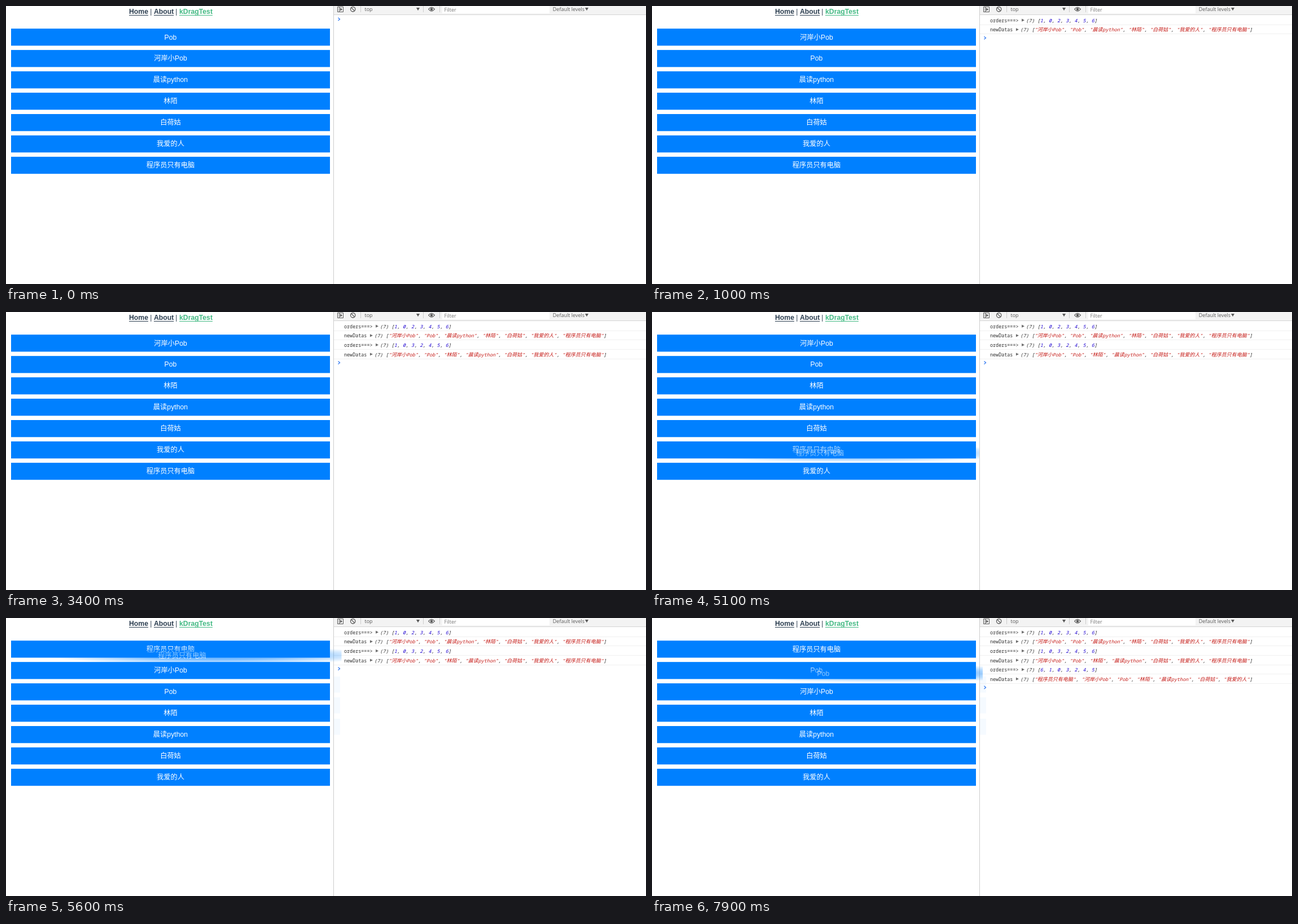
An HTML page with a canvas that plays this animation: 1134 by 494 pixels, repeating every 8 s.

```html
<!DOCTYPE html>
<html lang="zh-CN">
<head>
<meta charset="utf-8">
<title>Drag list</title>
<style>
html, body { margin: 0; width: 100%; height: 100%; overflow: hidden; background: #fff; }
canvas { display: block; }
</style>
</head>
<body>
<canvas id="stage" width="1134" height="494"></canvas>
<script>
const ctx = document.getElementById('stage').getContext('2d');
const LOOP = 8000, STEP = 100;
const BAR = { x: 9, y: 40.2, w: 565, h: 30.3, pitch: 37.95 };
const CJK = '"Noto Sans CJK SC", "Noto Sans CJK"';
const SANS = `"Liberation Sans", ${CJK}, sans-serif`;
const UI = '"Open Sans", "Noto Sans", sans-serif';
const MONO = '8.43px "Noto Sans Mono", monospace';
const labels = ['Pob', '河岸小Pob', '晨读python', '林陌', '白荷姑', '我爱的人', '程序员只有电脑'];

// Path points: sideways shift and middle of the dragged bar, one per step
const drags = [
  { start: 500, end: 1000, from: 0, cx: 345,
    path: [[1, 61], [2, 70], [3, 83], [4, 90], [4, 93]] },
  { start: 2800, end: 3400, from: 2, cx: 345,
    path: [[1.5, 144], [2, 153], [3, 162], [4, 167], [5, 170]] },
  { start: 5100, end: 6000, from: 6, cx: 350,
    path: [[6, 251], [13, 225], [18, 193], [18, 155], [18, 118], [20.5, 66.5], [23, 61], [24, 59]] },
  { start: 7800, end: 8000, from: 2, cx: 395,
    path: [[7, 118], [12, 98.3]] }
];

function text(s, x, y, font, color, align = 'left') {
  ctx.font = font;
  ctx.fillStyle = color;
  ctx.textAlign = align;
  ctx.fillText(s, x, y);
  return x + ctx.measureText(s).width;
}

function rect(x, y, w, h, color) {
  ctx.fillStyle = color;
  ctx.fillRect(x, y, w, h);
}

function poly(points, color) {
  ctx.fillStyle = color;
  ctx.beginPath();
  points.forEach(p => ctx.lineTo(p[0], p[1]));
  ctx.fill();
}

function stroke(color, width, draw) {
  ctx.strokeStyle = color;
  ctx.lineWidth = width;
  ctx.beginPath();
  draw();
  ctx.stroke();
}

function move(order, from, to) {
  const next = order.slice();
  next.splice(to, 0, next.splice(from, 1)[0]);
  return next;
}

function slot(mid) {
  return Math.round((mid - 55.3) / BAR.pitch);
}

// Soft copy of a bar that fades away from the pointer
const layer = document.createElement('canvas');
layer.width = 1134;
layer.height = 494;
const soft = layer.getContext('2d');

function drawGhost(label, dx, mid, cx) {
  soft.globalCompositeOperation = 'source-over';
  soft.clearRect(0, 0, 1134, 494);
  soft.fillStyle = '#0080ff';
  soft.fillRect(BAR.x + dx, mid - BAR.h / 2, BAR.w, BAR.h);
  soft.font = `12.25px ${SANS}`;
  soft.textAlign = 'center';
  soft.fillStyle = '#fff';
  soft.fillText(label, 291.5 + dx, mid + 4.2);
  soft.globalCompositeOperation = 'destination-in';
  soft.save();
  soft.translate(cx + dx, mid);
  soft.scale(300, 16.5);
  const fade = soft.createRadialGradient(0, 0, 0, 0, 0, 1);
  fade.addColorStop(0, 'rgba(0,0,0,.66)');
  fade.addColorStop(0.45, 'rgba(0,0,0,.5)');
  fade.addColorStop(0.75, 'rgba(0,0,0,.22)');
  fade.addColorStop(1, 'rgba(0,0,0,0)');
  soft.fillStyle = fade;
  soft.fillRect(-4, -40, 8, 80);
  soft.restore();
  ctx.drawImage(layer, 0, 0);
}

function drawNav() {
  const bold = `bold 12.25px ${SANS}`;
  const link = (s, x, color) => {
    const end = text(s, x, 14.3, bold, color);
    rect(x, 16, end - x, 1, color);
  };
  link('Home', 218, '#2c3e50');
  text('|', 255.3, 14.3, `12.25px ${SANS}`, '#2c3e50');
  link('About', 262, '#2c3e50');
  text('|', 300.3, 14.3, `12.25px ${SANS}`, '#2c3e50');
  link('kDragTest', 307, '#42b983');
}

function drawBars(order) {
  order.forEach((id, i) => {
    const y = BAR.y + BAR.pitch * i;
    rect(BAR.x, y, BAR.w, BAR.h, '#0080ff');
    text(labels[id], 291.5, y + 19.3, `12.25px ${SANS}`, '#fff', 'center');
  });
}

function drawToolbar() {
  const gray = '#5a5a5a';
  rect(580, 0, 1, 494, '#cccccc');
  rect(581, 0, 553, 15, '#f3f3f3');
  rect(581, 15, 553, 1, '#d4d4d4');
  stroke(gray, 1, () => {
    ctx.rect(587.5, 1.5, 10, 9);
    ctx.moveTo(590.5, 1.5);
    ctx.lineTo(590.5, 10.5);
  });
  poly([[592, 3], [596, 6], [592, 9]], gray);
  stroke(gray, 1.3, () => {
    ctx.arc(614.7, 5.8, 4.2, 0, Math.PI * 2);
    ctx.moveTo(611.8, 2.9);
    ctx.lineTo(617.6, 8.7);
  });
  [628, 739, 768].forEach(x => rect(x, 0, 1, 11, '#cccccc'));
  text('top', 635.5, 9.2, `9px ${UI}`, gray);
  poly([[727, 3], [733, 3], [730, 8.3]], gray);
  stroke(gray, 1.2, () => {
    ctx.moveTo(748.5, 5.7);
    ctx.quadraticCurveTo(754, -1, 759.5, 5.7);
    ctx.quadraticCurveTo(754, 12.4, 748.5, 5.7);
  });
  ctx.fillStyle = gray;
  ctx.beginPath();
  ctx.arc(754, 5.7, 2.3, 0, Math.PI * 2);
  ctx.fill();
  rect(773, 0, 190, 13, '#fff');
  text('Filter', 776.5, 9.7, `9px ${UI}`, '#757575');
  text('Default levels', 968.8, 9.2, `9px ${UI}`, gray);
  poly([[1026, 3], [1032, 3], [1029, 8.3]], gray);
}

function run(s, x, y, color, style = 'italic') {
  for (const part of s.match(/[\u4e00-\u9fff]+|[^\u4e00-\u9fff]+/g)) {
    const font = part[0] >= '\u4e00' ? `9px ${CJK}, sans-serif` : MONO;
    x = text(part, x, y, `${style} ${font}`, color);
  }
  return x;
}

function logLine(row, title, items, color) {
  const y = 28.8 + row * 16.6, dark = '#303030';
  let x = run(title, 599, y, dark, 'normal') + 5.5;
  poly([[x, y - 6.2], [x + 5, y - 3.6], [x, y - 1]], '#6e6e6e');
  x = run('(7) [', x + 7.5, y, dark);
  items.forEach((item, i) => {
    if (i) x = run(', ', x, y, dark);
    x = run(item, x, y, color);
  });
  run(']', x, y, dark);
  rect(581, Math.round(y + 4), 553, 1, '#f0f0f0');
}

function drawConsole(logs) {
  logs.forEach((order, i) => {
    logLine(i * 2, 'orders===>', order.map(String), '#1c00cf');
    logLine(i * 2 + 1, 'newDatas', order.map(id => `"${labels[id]}"`), '#c41a16');
  });
  const y = 23.4 + logs.length * 33.35;
  stroke('#367cf1', 1.3, () => {
    ctx.moveTo(588.5, y - 2.6);
    ctx.lineTo(591.5, y);
    ctx.lineTo(588.5, y + 2.6);
  });
}

// Pale trail left beside the list by the long drag
function drawTrail(t) {
  [179, 141, 104].forEach((y, i) => {
    if (t >= 5300 + i * STEP) rect(581, y, 11, 28.5, '#f5faff');
  });
}

function draw(t) {
  let order = labels.map((_, i) => i);
  let ghost = null;
  const logs = [];
  for (const d of drags) {
    if (t < d.start) break;
    const k = Math.min(Math.floor((t - d.start) / STEP), d.path.length - 1);
    const [dx, mid] = d.path[k];
    const id = order[d.from];
    order = move(order, d.from, slot(mid));
    if (t >= d.end) logs.push(order);
    else ghost = [labels[id], dx, mid, d.cx];
  }
  rect(0, 0, 1134, 494, '#fff');
  drawNav();
  drawBars(order);
  drawToolbar();
  drawTrail(t);
  drawConsole(logs);
  if (ghost) drawGhost(...ghost);
}

const begin = performance.now();
function tick() {
  draw((performance.now() - begin) % LOOP);
  requestAnimationFrame(tick);
}
tick();
</script>
</body>
</html>
```
